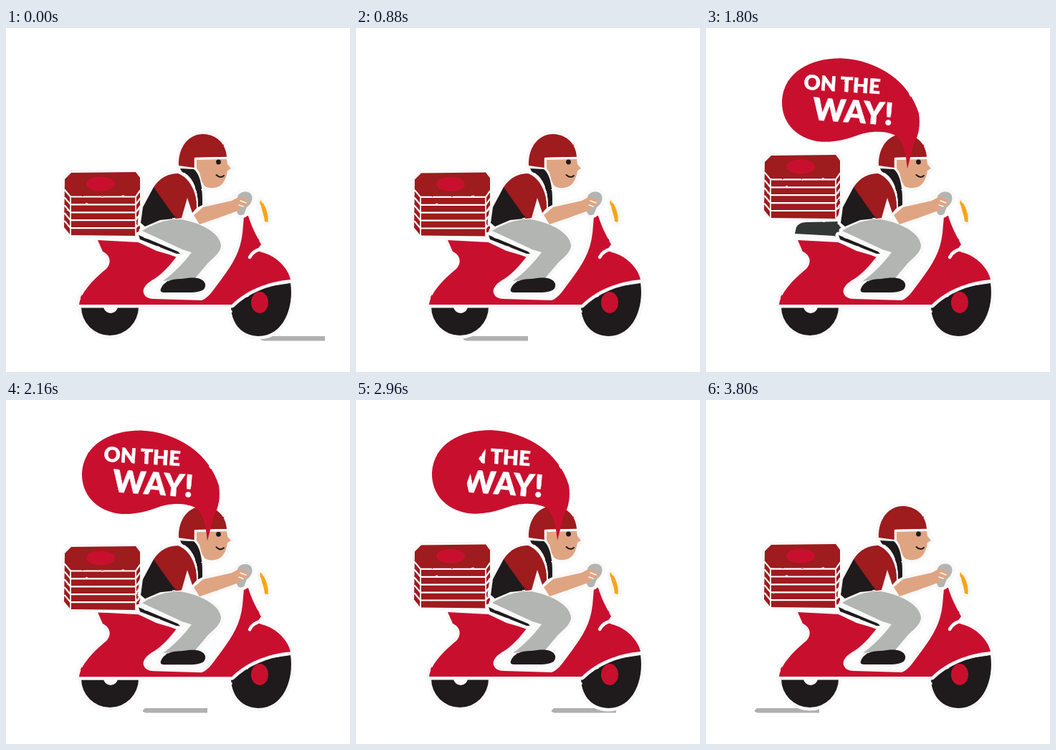
Recreate the animation shown at these times as an HTML page. Size 480 px wide and 480 px high, loop 3840 ms.

```html
<!DOCTYPE html>
<html lang="en">
<head>
<meta charset="utf-8">
<title>Delivery scooter</title>
<style>
  html, body { margin: 0; width: 100%; height: 100%; overflow: hidden; background: #fff; }
  svg { display: block; width: 100vw; height: 100vh; }
  text { font-family: Lato, "Open Sans", sans-serif; font-weight: 900; fill: #fff; stroke: #fff; stroke-width: .5; }
</style>
</head>
<body>
<svg viewBox="0 0 480 480">
  <defs>
    <filter id="rough" filterUnits="userSpaceOnUse" x="0" y="0" width="480" height="480" color-interpolation-filters="sRGB">
      <feTurbulence type="fractalNoise" baseFrequency=".1" seed="4"/>
      <feComponentTransfer result="noise"><feFuncA type="linear" slope="0" intercept="1"/></feComponentTransfer>
      <feDisplacementMap in="SourceGraphic" in2="noise" scale="2" xChannelSelector="R" yChannelSelector="G"/>
    </filter>
    <clipPath id="bubbleClip"><circle cx="290" cy="160" r="0"/></clipPath>
    <clipPath id="textClip"><circle cx="290" cy="160" r="0"/></clipPath>
  </defs>
  <g id="streak"><path filter="url(#rough)" fill="#b0b0b0" d="M0 433 L3 430 H90 V436.5 H4 L0 435 Z"/></g>
  <g id="wheels"></g>
  <g id="bike"></g>
  <g id="boxes"></g>
  <g id="rider"></g>
  <g id="bubble" clip-path="url(#bubbleClip)"></g>
  <g clip-path="url(#textClip)">
    <g filter="url(#rough)">
      <text font-size="28.5" transform="translate(136 85.5) rotate(3.5)">ON THE</text>
      <text font-size="43.2" transform="translate(148 128) rotate(4)">WAY!</text>
    </g>
  </g>
</svg>
<script>
const RED = '#c8102e', DARK = '#9e1b1e', INK = '#1f1a1b', SEAT = '#323736', GREY = '#b2b5b2',
      SKIN = '#dfa583', GOLD = '#f9a51a', EDGE = '#f9f9f9', WHITE = '#fff';
const LOOP = 3840, STEP = 40, BOB = 960;
const $ = id => document.getElementById(id);

const shape = (d, fill) => `<path d="${d}" fill="${fill}"/>`;
const line = (d, color, width) =>
  `<path d="${d}" fill="none" stroke="${color}" stroke-width="${width}" stroke-linecap="round" stroke-linejoin="round"/>`;
const oval = (x, y, rx, ry, fill) => `<ellipse cx="${x}" cy="${y}" rx="${rx}" ry="${ry}" fill="${fill}"/>`;

// Cut-out look: a pale rim behind the coloured parts.
function sticker(id, parts, extra = '', rim = 9) {
  const body = parts.map(([d, fill]) => shape(d, fill)).join('');
  const back = parts.map(([d]) => `<path d="${d}"/>`).join('');
  $(id).innerHTML = `<g filter="url(#rough)"><g fill="${EDGE}" stroke="${EDGE}" stroke-width="${rim}" stroke-linejoin="round">${back}</g>${body}${extra}</g>`;
}

sticker('wheels', [
  ['M105 389 A40 40 0 0 0 185 389 L176 366 H114 Z', INK],
  ['M314 385 L330 366 L397 356 C402 390 387 430 352 430 C326 429 313 409 314 385 Z', INK]
], oval(146, 388, 10, 10, WHITE) + oval(354, 383, 12, 15, RED));

sticker('bike', [
  ['M128 296 L185 299 L210 311 L238 319 C228 332 218 343 207 350 C196 356 190 363 192 370 Q195 378 206 378 L273 380 C284 376 290 364 301 350 C317 328 327 312 330 286 L332 263 L338 262 C342 276 350 291 356 302 L350 310 L357 313 C378 318 394 336 397 351 C364 354 334 367 315 386 L102 386 C104 371 118 354 140 336 C149 326 144 316 135 312 Z', RED],
  ['M124 287 L126 278 Q130 271 140 271 L188 270 L208 288 L243 313 L238 315 L190 293 L178 290 Z', SEAT],
  ['M355 240 C362 246 367 261 365.5 271 L361 270 C360 259 355 252 355 240 Z', GOLD]
], line('M340 320 Q344 311 357 308', WHITE, 4.5));

const layers = [0, 1, 2, 3, 4].map(i =>
  `<g transform="translate(0 ${i * 10.9})">${line('M82 226 L90 235.5 H181 L187 227', WHITE, 2.2)}</g>`).join('');
sticker('boxes', [
  ['M91 202 L181 201 L187 209 L187 281 L181 290 L90 289 L81 278 L82 211 Z', DARK]
], layers + line('M90 236 V289 M181 236 V289', WHITE, 1.8) + oval(132, 217.5, 20, 10, RED), 8);

sticker('rider', [
  ['M190 283 C205 273 225 266 243 267 C270 271 298 285 300 303 C300 314 288 321 280 330 L264 349 L219 353 C234 342 248 328 259 313 L246 309 Z', GREY],
  ['M185 289 L240 312 L243 315 L238 315 L187 295 Z', INK],
  ['M216 364 C220 354 230 350 245 350 C262 347 275 348 278 357 C279 365 274 368 260 369 L221 369 Q214 369 216 364 Z', INK],
  ['M206 222 L191 250 L188 272 L194 277 L215 268 L244 265 L225 225 Z', INK],
  ['M206 222 C215 208 228 203 240 203 C254 208 265 224 267 250 L260 258 L253 237 L245 265 L237 266 Z', DARK],
  ['M243 196 L262 197 C270 203 275 220 274 247 L268 250 C268 228 263 211 245 200 Z', INK],
  ['M266 184 L308 183 L309 190 L314 196 L309 199 C307 212 302 222 290 223 C281 224 275 221 273 214 L270 202 L266 196 Z', SKIN],
  ['M241 192 C240 166 255 148 275 148 C296 149 307 163 308 180 L265 181 L263 195 Z', DARK],
  ['M323 236 C325 227 340 226 343 234 C345 240 341 247 336 250 L332 260 Q324 264 322 256 Z', GREY],
  ['M262 261 L275 250 L315 241 L326 235 L336 239 L339 246 L331 249 L324 255 L296 265 L270 274 Z', SKIN]
], line('M249 203 C261 211 267 228 267 250', WHITE, 2)
 + line('M264 196 L264 182 L308 181', WHITE, 2.5)
 + line('M327 241 L335 244 M325 247 L331 249', EDGE, 1.5)
 + oval(296.5, 187, 3.4, 3.4, INK)
 + line('M293.5 205 Q299 210.5 304 206', INK, 2));

$('bubble').innerHTML = '<g filter="url(#rough)">' + shape(
  'M281 196 C279 178 277 158 263 149 C247 142 225 144 210 150 C190 157 174 160 156 158 C122 152 105 128 106 101 C109 62 144 42 188 42 C240 44 284 75 297 119 C300 139 295 153 290 161 Z', RED) + '</g>';

const shift = (id, x, y) => $(id).setAttribute('transform', `translate(${x} ${y})`);
const radius = (id, r) => $(id).firstElementChild.setAttribute('r', Math.max(0, r));
const passes = [0, 680, 1320, 2000, 2880, 3520];

// Circular wipe, out from the mouth and back.
const wipe = (t, open, close) => Math.min((t - open) * .8, 210, (close - t) * .8);

function draw(t) {
  const wave = (1 - Math.cos(2 * Math.PI * t / BOB)) / 2;
  const dip = 5 * wave ** 4;
  const hop = t > 1680 && t < 1920 ? 25 * Math.sin(Math.PI * (t - 1680) / 240) : 0;
  shift('bike', 0, dip);
  shift('rider', 0, dip);
  shift('boxes', 0, 6 * wave - hop);
  shift('bubble', 0, wave);

  const start = passes.find(p => t >= p && t < p + 8 * STEP);
  $('streak').style.display = start === undefined ? 'none' : '';
  if (start !== undefined) shift('streak', 355 - 41 * (t - start) / STEP, 0);

  radius('bubbleClip', wipe(t, 1182, 3280));
  radius('textClip', wipe(t, 1320, 3138));
}

const began = performance.now();
let last = -1;
function tick() {
  const t = Math.floor((performance.now() - began) % LOOP / STEP) * STEP;
  if (t !== last) draw(last = t);
  requestAnimationFrame(tick);
}
tick();
</script>
</body>
</html>
```
